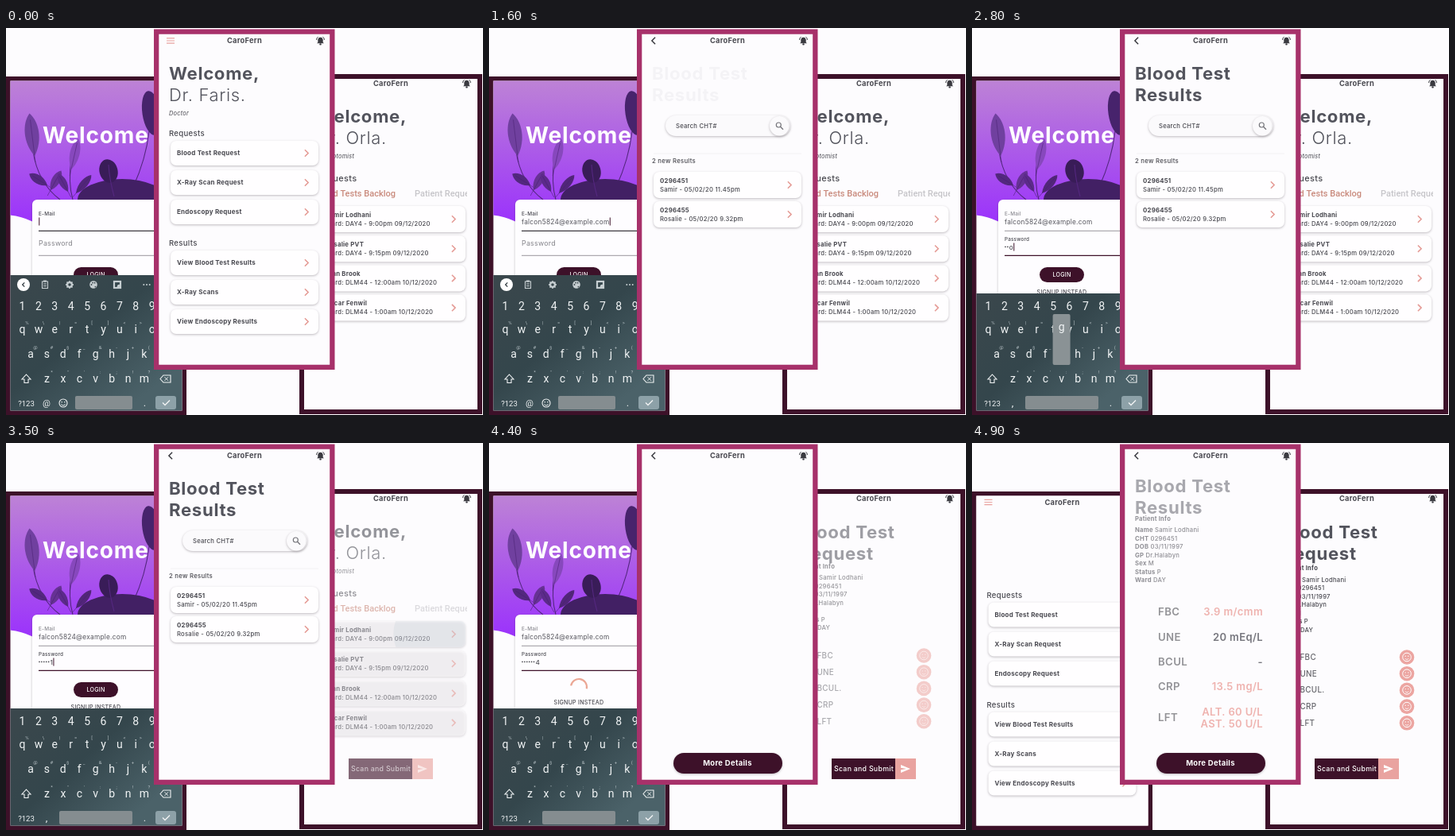
Write an HTML page with a canvas that moves like this. It is 600x487 px and loops after 5000 ms.

```html
<!DOCTYPE html>
<html lang="en">
<head>
<meta charset="utf-8">
<title>Clinic app</title>
<style>
html, body { margin: 0; width: 100%; height: 100%; overflow: hidden; background: #fdfcfe; }
canvas { display: block; width: 600px; height: 487px; }
</style>
</head>
<body>
<canvas id="stage"></canvas>
<script>
const W = 600, H = 487, LOOP = 5000;
const PLUM = '#3d1129', ROSE = '#a7316a', PINK = '#e9a3a0', INK = '#48484f', HEAD = '#53545d', PAPER = '#fdfcfe';
const APP = 'CaroFern', EMAIL = 'falcon5824@example.com';
const canvas = document.getElementById('stage'), c = canvas.getContext('2d');
const dpr = window.devicePixelRatio || 1;
canvas.width = W * dpr;
canvas.height = H * dpr;

const ramp = (t, a, b) => Math.min(1, Math.max(0, (t - a) / (b - a)));

function group(alpha, dx, dy, draw) {
  if (alpha <= 0) return;
  c.save();
  c.globalAlpha *= alpha;
  c.translate(dx, dy);
  draw();
  c.restore();
}

function text(s, x, y, size, o = {}) {
  c.font = `${o.italic ? 'italic ' : ''}${o.weight || 500} ${size}px ${o.font || 'Inter'}, sans-serif`;
  c.letterSpacing = (o.font ? 0 : size * 0.03) + 'px';
  c.textAlign = o.align || 'left';
  c.fillStyle = o.color || INK;
  c.fillText(s, x, y);
  return c.measureText(s).width;
}

function box(x, y, w, h, r, fill, shadow) {
  c.save();
  if (shadow) {
    c.shadowColor = 'rgba(60,50,60,.32)';
    c.shadowBlur = 3 * dpr;
    c.shadowOffsetY = dpr;
  }
  c.fillStyle = fill;
  c.beginPath();
  c.roundRect(x, y, w, h, r);
  c.fill();
  c.restore();
}

function line(points, color, width = 1) {
  c.strokeStyle = color;
  c.lineWidth = width;
  c.beginPath();
  points.forEach(([x, y]) => c.lineTo(x, y));
  c.stroke();
}

function disc(x, y, r, fill, ry = r, turn = 0) {
  c.fillStyle = fill;
  c.beginPath();
  c.ellipse(x, y, r, ry, turn, 0, 7);
  c.fill();
}

function arc(x, y, r, from, to, color, width = 1) {
  c.strokeStyle = color;
  c.lineWidth = width;
  c.beginPath();
  c.arc(x, y, r, from, to);
  c.stroke();
}

const ring = (x, y, r, color, width) => arc(x, y, r, 0, 7, color, width);

function chevron(x, y, size, dir, color, width) {
  line([[x - dir * size / 2, y - size], [x + dir * size / 2, y], [x - dir * size / 2, y + size]], color, width);
}

function frame(x, y, w, h, edge, color, draw) {
  c.save();
  c.fillStyle = color;
  c.fillRect(x, y, w, h);
  c.beginPath();
  c.rect(x + edge, y + edge, w - 2 * edge, h - 2 * edge);
  c.clip();
  c.fillStyle = PAPER;
  c.fillRect(x, y, w, h);
  draw();
  c.restore();
}

function bell(x, y) {
  c.fillStyle = '#3a3a40';
  c.beginPath();
  c.moveTo(x - 4.5, y + 3.3);
  c.lineTo(x - 3.2, y + 2);
  c.lineTo(x - 3.2, y - 1);
  c.bezierCurveTo(x - 3, y - 5.5, x + 3, y - 5.5, x + 3.2, y - 1);
  c.lineTo(x + 3.2, y + 2);
  c.lineTo(x + 4.5, y + 3.3);
  c.fill();
  disc(x, y + 4.4, 1.2, '#3a3a40');
  arc(x, y - 1, 4.9, -0.9, 0, '#3a3a40', 1);
  arc(x, y - 1, 4.9, Math.PI, Math.PI + 0.9, '#3a3a40', 1);
}

function bar(x, y, icon) {
  text(APP, x, y + 3, 9.3, { weight: 700, align: 'center' });
  if (icon === 'menu') {
    for (const k of [-3.2, 0, 3.2]) line([[x - 98, y + k], [x - 88, y + k]], PINK, 1.2);
  } else if (icon === 'back') chevron(x - 93, y, 4.2, -1, '#3a3a40', 1.5);
  bell(x + 95.5, y);
}

function heading(a, b, x, y, light) {
  text(a, x, y, 22.2, { weight: 700, color: HEAD });
  text(b, x, y + 27, light ? 22 : 22.2, { weight: light ? 300 : 700, color: HEAD });
}

function card(x, y, w, h, title, sub) {
  box(x, y, w, h, 7, '#fffeff', true);
  chevron(x + w - 15, y + h / 2, 4.2, 1, '#e59c97', 1.6);
  if (sub) {
    text(title, x + 8, y + h / 2 - 3, 7.8, { weight: 700 });
    text(sub, x + 8, y + h / 2 + 8, 7.7);
  } else text(title, x + 8, y + 18, 8, { weight: 700 });
}

// Pages laid out in the middle phone's coordinates

function home(headAlpha) {
  bar(300, 16, 'menu');
  group(headAlpha, 0, 0, () => {
    heading('Welcome,', 'Dr. Faris.', 205, 65, true);
    text('Doctor', 205, 110, 7.4, { italic: true, weight: 400 });
  });
  text('Requests', 205, 136, 9.6);
  ['Blood Test Request', 'X-Ray Scan Request', 'Endoscopy Request']
    .forEach((s, i) => card(207, 142 + i * 37, 186, 31, s));
  text('Results', 205, 274, 9.6);
  ['View Blood Test Results', 'X-Ray Scans', 'View Endoscopy Results']
    .forEach((s, i) => card(207, 280 + i * 37, 186, 31, s));
}

function results(headAlpha) {
  group(headAlpha, 0, 0, () => heading('Blood Test', 'Results', 205, 65));
  box(222, 110, 157, 26, 13, '#fbfafc', true);
  text('Search CHT#', 235, 126, 7.7);
  box(353, 111, 24.5, 24.5, 12.2, '#fbfafc', true);
  ring(364.3, 122, 3, '#77777d', 1.2);
  line([[366.5, 124.2], [370, 127.7]], '#77777d', 1.4);
  line([[207, 158], [393, 158]], '#f3f1f4');
  text('2 new Results', 205, 170, 7.8);
  card(207, 181, 186, 33, '0296451', 'Samir - 05/02/20 11.45pm');
  card(207, 218, 186, 33, '0296455', 'Rosalie - 05/02/20 9.32pm');
}

const INFO = [['Name', 'Samir Lodhani'], ['CHT', '0296451'], ['DOB', '03/11/1997'], ['GP', 'Dr.Halabyn'],
  ['Sex', 'M'], ['Status', 'P'], ['Ward', 'DAY']];

function patient(x, y, lead) {
  text('Patient Info', x, y, 7.6, { weight: 700 });
  INFO.forEach(([k, v], i) => {
    const ly = y + lead + i * 10.5;
    const w = text(k, x, ly, 7.7, { weight: 700 });
    text(v, x + w + 2.2, ly, 7.7);
  });
}

function details(t) {
  const a = ramp(t, 4600, 5200);
  group(a, 0, -6 * (1 - a), () => heading('Blood Test', 'Results', 205, 65));
  group(ramp(t, 4600, 5100), 0, 0, () => patient(205, 98, 14));
  const rows = [['FBC', 217, '3.9 m/cmm'], ['UNE', 248.5, '20 mEq/L'], ['BCUL', 279.5, '-'],
    ['CRP', 311, '13.5 mg/L'], ['LFT', 350, 'ALT. 60 U/L', 'AST. 50 U/L']];
  rows.forEach(([k, y, ...vals], i) => group(ramp(t, 4500, 5000), 0, 0, () => {
    text(k, 234, y, 13.2, { weight: 600, color: '#77777d' });
    const color = i === 1 || i === 2 ? '#55555d' : '#eba09b';
    vals.forEach((v, j) => text(v, 366, vals[1] ? y - 7 + j * 15 : y, 13, { weight: 600, color, align: 'right' }));
  }));
  box(232, 390, 137, 26, 13, PLUM, true);
  text('More Details', 300, 406, 9.5, { weight: 700, color: '#fff', align: 'center' });
}

function middle(t) {
  const toResults = ramp(t, 1250, 1450), toDetails = ramp(t, 3850, 4100);
  if (t < 1450) group(1 - toResults, 0, 0, () => home(1));
  if (t >= 1250) bar(300, 16, 'back');
  group(toResults * (1 - toDetails), 0, 0, () => results(ramp(t, 1570, 2200)));
  group(toDetails, 0, 0, () => details(t));
}

// Right phone

function backlog(t) {
  heading('Welcome,', 'Dr. Orla.', 390, 119, true);
  text('Phlebotomist', 390, 164, 7.4, { italic: true, weight: 400 });
  text('Requests', 390, 193, 11);
  c.save();
  c.beginPath();
  c.rect(370, 195, 210, 25);
  c.clip();
  text('Blood Tests Backlog', 490, 212, 11, { font: 'Roboto', align: 'right', color: '#c98a7c' });
  text('Patient Requests', 514, 212, 11, { font: 'Roboto', color: '#c6c5c9' });
  c.restore();
  [['Samir Lodhani', 'Ward: DAY4 - 9:00pm 09/12/2020'], ['Rosalie PVT', 'Ward: DAY4 - 9:15pm 09/12/2020'],
    ['Alan Brook', 'Ward: DLM44 - 12:00am 10/12/2020'], ['Oscar Fenwil', 'Ward: DLM44 - 1:00am 10/12/2020']]
    .forEach(([n, s], i) => card(394, 224 + i * 37.2, 184, 33, n, s));
  if (t > 3250) {
    c.save();
    c.beginPath();
    c.roundRect(394, 224, 184, 33, 7);
    c.clip();
    disc(535, 240, 10 + 45 * ramp(t, 3250, 3550), 'rgba(150,175,190,.22)');
    c.restore();
  }
}

function request(a) {
  group(a, 0, 0, () => heading('Blood Test', 'Request', 390, 120));
  group(a, 0, -8 * (1 - a), () => {
    patient(390, 160, 14.5);
    ['FBC', 'UNE', 'BCUL.', 'CRP', 'LFT'].forEach((s, i) => {
      const y = 269.5 + i * 20.7;
      text(s, 412.5, y + 3.5, 9.9, { color: '#66666c' });
      disc(547, y, 9.3, '#eca5a1');
      ring(547, y, 5.3, '#fff', 1);
      disc(545.2, y - 1.3, 0.7, '#fff');
      disc(548.8, y - 1.3, 0.7, '#fff');
      arc(547, y + 0.5, 2.4, 0.4, 2.7, '#fff', 0.8);
    });
  });
}

function scanButton() {
  box(431, 397, 80, 26, 0, PLUM);
  box(511, 397, 26, 26, 0, PINK);
  text('Scan and Submit', 434, 413, 8.8, { color: '#fff' });
  c.fillStyle = '#fff';
  c.beginPath();
  [[518, 405], [530, 410], [518, 415], [518, 411.2], [525, 410], [518, 408.8]].forEach(p => c.lineTo(...p));
  c.fill();
}

function right(t) {
  bar(484, 70);
  group(1 - ramp(t, 3250, 3900), 0, 0, () => backlog(t));
  group(ramp(t, 3250, 3650), 0, 0, scanButton);
  group(ramp(t, 3900, 4570), 0, 0, () => request(ramp(t, 3900, 4570)));
}

// Left phone

function leaf(x, y, len, wide, turn, color) {
  c.save();
  c.translate(x, y);
  c.rotate(turn);
  c.fillStyle = color;
  c.beginPath();
  c.moveTo(0, 0);
  c.bezierCurveTo(-wide, -len * 0.35, -wide * 0.8, -len * 0.8, 0, -len);
  c.bezierCurveTo(wide * 0.8, -len * 0.8, wide, -len * 0.35, 0, 0);
  c.fill();
  line([[0, 8], [0, -len * 0.85]], 'rgba(70,30,110,.6)', 0.8);
  c.restore();
}

function stem(x1, y1, qx, qy, x2, y2) {
  c.strokeStyle = '#54277f';
  c.lineWidth = 1.1;
  c.beginPath();
  c.moveTo(x1, y1);
  c.quadraticCurveTo(qx, qy, x2, y2);
  c.stroke();
}

function garden() {
  const g = c.createLinearGradient(0, 67, 0, 240);
  g.addColorStop(0, '#bd82d6');
  g.addColorStop(0.5, '#ac5be8');
  g.addColorStop(1, '#9c34fb');
  c.fillStyle = g;
  c.beginPath();
  c.moveTo(0, 60);
  c.lineTo(230, 60);
  c.lineTo(230, 262);
  c.bezierCurveTo(120, 262, 50, 250, 32, 243);
  c.quadraticCurveTo(18, 236, 0, 235);
  c.fill();
  stem(34, 155, 40, 195, 68, 216);
  stem(82, 165, 78, 195, 84, 216);
  stem(180, 130, 176, 165, 160, 200);
  leaf(36, 161, 54, 13, -0.12, '#70409f');
  leaf(82, 178, 40, 9, 0.22, '#8748bd');
  leaf(52, 198, 27, 8, -1, '#53287f');
  leaf(56, 204, 28, 8, 0.5, '#663294');
  leaf(78, 206, 26, 7, -0.5, '#5c2b8a');
  leaf(88, 208, 30, 7, 0.7, '#512679');
  disc(183, 107, 11.5, '#47236c', 28, -0.15);
  disc(146, 216, 56, '#422064', 26);
  disc(129, 180, 11.5, '#391c58', 15, -0.25);
  stem(129, 172, 130, 190, 136, 212);
  text('Welcome', 46, 145, 28, { weight: 700, color: '#fff' });
}

const EMAIL_KEYS = [[500, 'f'], [700, 'a'], [900, 'l']];
const PASS_KEYS = [[2200, 'd'], [2400, 'r'], [2700, 'o'], [2900, 'g'], [3200, 's'], [3500, '1'], [3700, '4']];
const PASTE = 1250, SWITCH = 1950, LOGIN = 3950;
const typed = (keys, t) => keys.filter(k => t >= k[0]).map(k => k[1]);

function form(t) {
  const pass = t >= SWITCH, busy = t >= LOGIN;
  box(33, 216, 200, 180, 6, '#fefdff', true);
  text('E-Mail', 41, 236, 6.4, { color: pass ? '#8a8a90' : INK });
  const mail = t >= PASTE ? EMAIL : typed(EMAIL_KEYS, t).join('');
  let end = 41 + text(mail, 41, 247, 8.3, { weight: 400, color: '#55555c' });
  let cy = 238.5;
  line([[41, 255.3], [200, 255.3]], pass ? '#99979d' : '#3c3a40', pass ? 1 : 1.3);
  if (pass) {
    text('Password', 41, 268, 6.3);
    const chars = typed(PASS_KEYS, t), n = chars.length;
    for (let i = 0; i < n - 1; i++) disc(42 + i * 2.9, 275.3, 0.85, INK);
    end = 41 + Math.max(0, n - 1) * 2.9;
    if (n) end += text(chars[n - 1], end, 279, 8.2, { color: '#55555c' });
    cy = 270.5;
  } else text('Password', 41, 274, 8.8, { weight: 400, color: '#85858b' });
  line([[41, 286.3], [200, 286.3]], pass ? PLUM : '#99979d', pass ? 1.3 : 1);
  if (busy) {
    const turn = 3.3 + (t - 4400) / 1000 * Math.PI * 2;
    arc(113, 307, 10, turn, turn + 3.2, '#eba795', 2.2);
  } else {
    line([[end + 0.8, cy], [end + 0.8, cy + 10]], PLUM, 1);
    box(85, 301, 56, 19, 9.5, PLUM);
    text('LOGIN', 113, 313, 7.1, { color: '#fff', align: 'center' });
  }
  text('SIGNUP INSTEAD', 113, busy ? 328.5 : 335, 7.1, { align: 'center' });
}

const ROWS = [['1234567890', 20.5, 350, ''], ['qwertyuiop', 20.5, 379, '%\\|=[]<>{}'],
  ['asdfghjkl', 31, 410, '@#$_&-+()'], ['zxcvbnm', 51.5, 441, '*"\':;!?']];
const KEY = '#f0f3f4', LIGHT = { font: 'Roboto', weight: 400, color: KEY, align: 'center' };

function popup(key) {
  const [s, x0, y] = ROWS.find(r => r[0].includes(key));
  const x = x0 + s.indexOf(key) * 20.4;
  box(x - 11, y - 50, 22, 64, 2, '#8a9295');
  text(key, x, y - 29, 14, LIGHT);
}

function tools() {
  chevron(22, 323, 2.6, -1, '#333d42', 1.3);
  c.strokeStyle = '#c6ced1';
  c.lineWidth = 1.1;
  c.strokeRect(45.5, 319, 7, 8.5);
  line([[47, 318.5], [51, 318.5]], '#c6ced1', 2);
  line([[47, 322], [51, 322]], '#c6ced1');
  line([[47, 324.6], [51, 324.6]], '#c6ced1');
  ring(80, 323, 2.9, '#c6ced1', 2.2);
  for (let i = 0; i < 8; i++) disc(80 + 4.2 * Math.cos(i * Math.PI / 4), 323 + 4.2 * Math.sin(i * Math.PI / 4), 0.9, '#c6ced1');
  disc(110, 323, 4.8, '#c6ced1');
  [[-2.5, 0], [-1, -2.4], [1.6, -2.3], [2.4, 2.6]].forEach(([x, y]) => disc(110 + x, 323 + y, 0.9, '#3a474c'));
  c.strokeRect(136, 319, 8, 8);
  disc(142.3, 325.3, 2.5, '#c6ced1');
  for (const x of [173.3, 177, 180.7]) disc(x, 323, 1, '#c6ced1');
}

function hints(t) {
  chevron(22, 323, 2.6, 1, '#333d42', 1.3);
  text(typed(EMAIL_KEYS, t).join(''), 55, 326, 9, LIGHT);
  const [user, host] = EMAIL.split('@');
  text(user, 112, 320, 8.6, { ...LIGHT, weight: 700 });
  text('@' + host, 112, 329.5, 6.8, LIGHT);
  for (const x of [81, 143]) line([[x, 317], [x, 329]], '#68767b', 0.8);
}

function keyboard(t) {
  const pass = t >= SWITCH, top = pass ? 334 : 311;
  const g = c.createLinearGradient(20, top, 150, 481);
  g.addColorStop(0, '#3a474c');
  g.addColorStop(0.5, '#34464c');
  g.addColorStop(1, '#4b6269');
  c.fillStyle = g;
  c.fillRect(0, top, 230, 180);
  if (!pass) {
    disc(22, 323, 8, '#fff');
    if (t >= EMAIL_KEYS[0][0] && t < PASTE) hints(t);
    else tools();
  }
  for (const [s, x0, y, alt] of ROWS) [...s].forEach((k, i) => {
    const x = x0 + i * 20.4;
    text(k, x, y + 5, 14, LIGHT);
    if (alt) text(alt[i], x + 6, y - 6.5, 6, { ...LIGHT, color: '#b4bfc3' });
  });
  c.strokeStyle = KEY;
  c.lineWidth = 1.1;
  c.beginPath();
  [[25.5, 436], [31, 442], [28, 442], [28, 446.5], [23, 446.5], [23, 442], [20, 442]].forEach(p => c.lineTo(...p));
  c.closePath();
  c.stroke();
  c.beginPath();
  [[194, 441.5], [198, 437], [207, 437], [207, 446], [198, 446]].forEach(p => c.lineTo(...p));
  c.closePath();
  c.stroke();
  line([[199.5, 439.3], [204, 443.8]], KEY);
  line([[204, 439.3], [199.5, 443.8]], KEY);
  text('?123', 25.5, 475.5, 9.6, LIGHT);
  text(pass ? ',' : '@', 51, 476, pass ? 13 : 11, LIGHT);
  if (!pass) {
    ring(72, 472, 5, KEY, 1.1);
    disc(70.2, 470.7, 0.8, KEY);
    disc(73.8, 470.7, 0.8, KEY);
    arc(72, 472.4, 2.6, 0.3, 2.8, KEY, 1);
  }
  const left = pass ? 67 : 87;
  box(left, 463, 159 - left, 17, 2, '#858d90');
  text('.', 174.5, 476, 13, LIGHT);
  box(188, 463, 26, 17, 3, '#8da1a8');
  line([[197, 471.5], [200, 474.5], [206, 468.5]], KEY, 1.3);
  const down = [...EMAIL_KEYS, ...PASS_KEYS].find(k => t >= k[0] - 100 && t < k[0]);
  if (down) popup(down[1]);
}

function left(t) {
  const done = ramp(t, 4620, 4750);
  if (done < 1) {
    garden();
    form(t);
    keyboard(t);
  }
  group(done, 0, 0, () => {
    c.fillStyle = PAPER;
    c.fillRect(0, 60, 230, 427);
    c.translate(-186.5, 58.5);
    home(0);
  });
}

function draw(now) {
  const t = now % LOOP;
  c.setTransform(dpr, 0, 0, dpr, 0, 0);
  c.fillStyle = PAPER;
  c.fillRect(0, 0, W, H);
  frame(0, 61, 227, 426, 5.5, PLUM, () => left(t));
  frame(369, 58, 230, 428, 6, PLUM, () => right(t));
  frame(186, 1.5, 227.5, 428.5, 6.3, ROSE, () => middle(t));
}

const start = performance.now();
(function tick() {
  draw(performance.now() - start);
  requestAnimationFrame(tick);
})();
</script>
</body>
</html>
```
